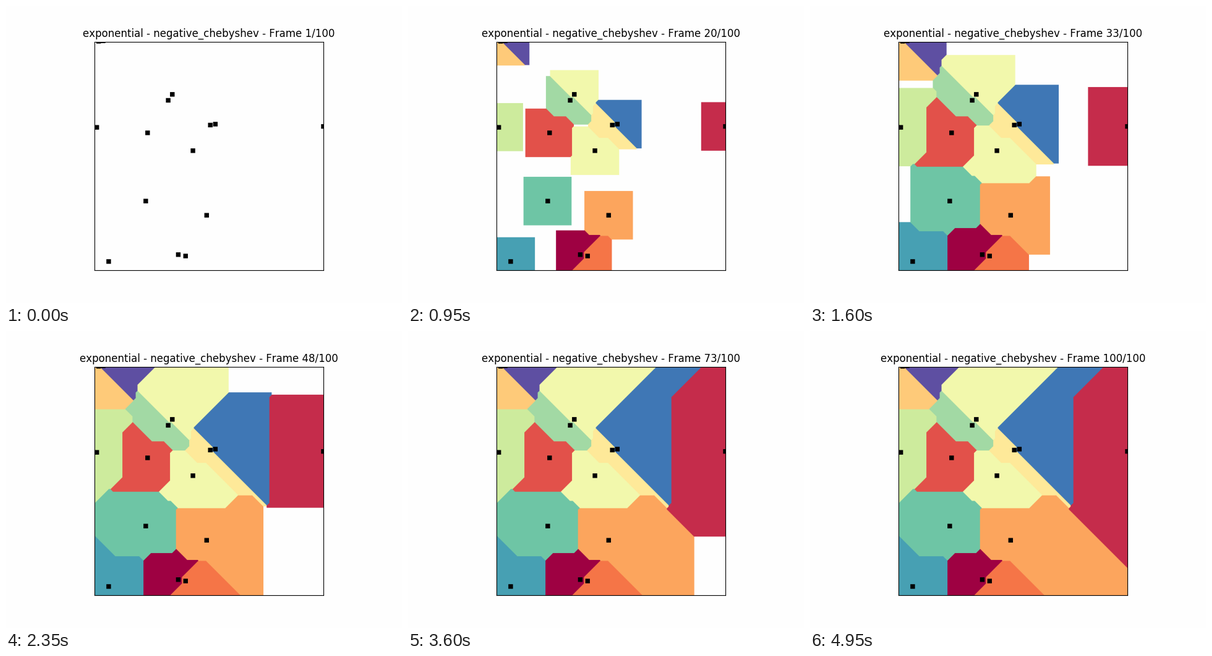
A matplotlib script that plays this animation: 640 px wide and 480 px high, repeating every 5 s.

```python
import numpy as np
import matplotlib.pyplot as plt
from matplotlib.animation import FuncAnimation
from matplotlib.colors import to_rgb

FRAMES = 100
GRID = 500
MARK = 0.01
WHITE = "#fefefe"
YELLOW = "#f2f8ac"

# Seed points in the unit square (y down), ordered along the colormap
SEEDS = [
    (.3655, .933), (1, .3715), (.231, .3995), (.398, .939), (.4905, .761),
    (.0175, -.001), (.506, .3655), (.339, .2305), (.43, .478), (.01, .375),
    (.3215, .257), (.2225, .6985), (.0615, .963), (.528, .3615), (.0375, -.003),
]

plt.rcParams.update({"font.family": "DejaVu Sans", "text.kerning_factor": 6})


def rgb8(color):
    return np.round(np.array(color) * 255).astype(np.uint8)


colors = plt.get_cmap("Spectral")(np.linspace(0, 1, len(SEEDS)))[:, :3]
colors[7:9] = to_rgb(YELLOW)

# Chebyshev distance from every grid point to its nearest seed
gx, gy = np.meshgrid(*[np.linspace(0, 1, GRID)] * 2)
dist = np.array([np.maximum(abs(gx - x), abs(gy - y)) for x, y in SEEDS])
near = dist.min(axis=0)
cells = rgb8(colors)[dist.argmin(axis=0)]
blank = rgb8(to_rgb(WHITE))


def picture(i):
    radius = MARK + 0.5 * i / (FRAMES - 1)
    img = np.where((near <= radius)[..., None], cells, blank)
    img[near <= MARK] = 0
    return img


fig, ax = plt.subplots(figsize=(6.4, 4.8), dpi=100, facecolor=WHITE)
image = ax.imshow(picture(0))
ax.set(xticks=[], yticks=[], facecolor=WHITE)
title = ax.set_title("")


def draw(i):
    image.set_data(picture(i))
    title.set_text(f"exponential - negative_chebyshev - Frame {i + 1}/{FRAMES}")
    return image, title


anim = FuncAnimation(fig, draw, frames=FRAMES, interval=50, repeat=True,
                     repeat_delay=0)
plt.show()
```
